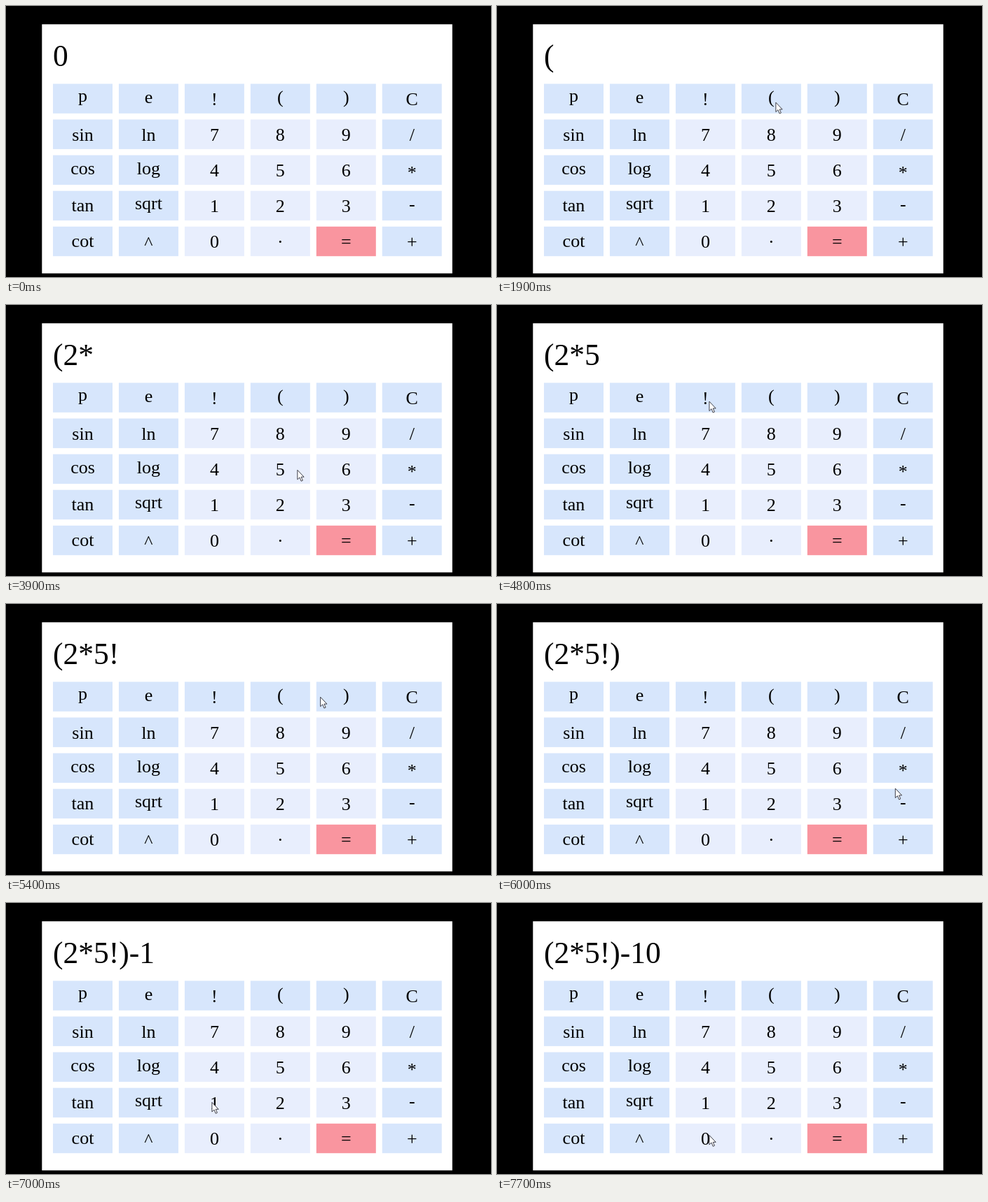
Write an HTML page that moves like this. It is 692 by 388 pixels and loops after 8000 ms.

```html
<!DOCTYPE html>
<html lang="en">
<head>
<meta charset="utf-8">
<title>Calculator</title>
<style>
  html, body { margin: 0; width: 100%; height: 100%; overflow: hidden; background: #000; }
  svg { display: block; }
  text { font-family: "Liberation Serif", "Times New Roman", serif; fill: #000; }
</style>
</head>
<body>
<svg width="692" height="388" viewBox="0 0 692 388">
  <rect x="51.3" y="26.2" width="585.5" height="356.6" fill="#fff"/>
  <g id="keys"></g>
  <text id="display" x="67" y="86.4" font-size="43.5"></text>
  <path id="cursor" d="M.5 .5V14L3.6 11.1L5.8 16.4L8 15.4L5.8 10.4H9.8Z"
        fill="#fff" stroke="#2b2b35" stroke-width=".9" stroke-linejoin="round"/>
</svg>
<script>
const LOOP = 8000, STEP = 100;
const KEY = { width: 85, height: 42.4, font: 26 };
const ROWS = [
  "p e ! ( ) C",
  "sin ln 7 8 9 /",
  "cos log 4 5 6 *",
  "tan sqrt 1 2 3 -",
  "cot ^ 0 · = +"
].map(row => row.split(" "));

// Pointer travels from `leave` to `arrive`, resting at an offset from the key's centre.
const PRESSES = [
  { key: "(", leave: 1900, arrive: 1900, typed: 1900, dx: 6, dy: 5 },
  { key: "2", leave: 1900, arrive: 2400, typed: 2500, dx: 14, dy: 8 },
  { key: "*", leave: 2700, arrive: 3000, typed: 3200, dx: 11, dy: 0 },
  { key: "5", leave: 3500, arrive: 3900, typed: 4400, dx: 24, dy: 1 },
  { key: "!", leave: 4400, arrive: 4800, typed: 4900, dx: 5, dy: 5 },
  { key: ")", leave: 4900, arrive: 5500, typed: 5600, dx: -33, dy: 0 },
  { key: "-", leave: 5600, arrive: 6200, typed: 6300, dx: 3, dy: -6 },
  { key: "1", leave: 6400, arrive: 6900, typed: 6900, dx: -4, dy: -1 },
  { key: "0", leave: 7000, arrive: 7600, typed: 7700, dx: 5, dy: -5 }
];

const byId = id => document.getElementById(id);
const display = byId("display"), cursor = byId("cursor");
const easeOut = k => 1 - (1 - k) ** 2;
const clamp = k => Math.min(1, Math.max(0, k));

const keyCenter = (row, col) => [109.5 + 93.95 * col, 132.6 + 51.1 * row];

function restPoint({ key, dx, dy }) {
  const row = ROWS.findIndex(labels => labels.includes(key));
  const [x, y] = keyCenter(row, ROWS[row].indexOf(key));
  return [x + dx, y + dy];
}

function add(tag, attrs, text = "") {
  const node = document.createElementNS("http://www.w3.org/2000/svg", tag);
  for (const name in attrs) node.setAttribute(name, attrs[name]);
  node.textContent = text;
  byId("keys").appendChild(node);
}

function keyColor(label) {
  if (label === "=") return "#f9959f";
  return /[0-9·]/.test(label) ? "#e8eefd" : "#d7e6fc";
}

function buildKeys() {
  const { width, height, font } = KEY;
  const ink = document.createElement("canvas").getContext("2d");
  ink.font = `${font}px "Liberation Serif", "Times New Roman", serif`;
  ROWS.forEach((labels, row) => labels.forEach((label, col) => {
    const [x, y] = keyCenter(row, col);
    add("rect", { x: x - width / 2, y: y - height / 2, width, height, fill: keyColor(label) });
    // Each label is centred vertically by its inked area.
    const m = ink.measureText(label);
    const drop = (m.actualBoundingBoxAscent - m.actualBoundingBoxDescent) / 2;
    add("text", { x, y: y + drop + 0.4, "font-size": font, "text-anchor": "middle" }, label);
  }));
}

function pointerAt(t) {
  const i = PRESSES.findLastIndex(p => p.leave <= t);
  if (i < 0) return null;
  const { leave, arrive } = PRESSES[i];
  const from = restPoint(PRESSES[Math.max(0, i - 1)]), to = restPoint(PRESSES[i]);
  const k = easeOut(clamp((t - leave) / (arrive - leave || 1)));
  return from.map((v, axis) => v + (to[axis] - v) * k);
}

function render(time) {
  const t = Math.floor((time % LOOP) / STEP) * STEP;
  const typed = PRESSES.filter(p => p.typed <= t).map(p => p.key).join("");
  display.textContent = typed || "0";
  const tip = pointerAt(t);
  cursor.setAttribute("visibility", tip ? "visible" : "hidden");
  if (tip) cursor.setAttribute("transform", `translate(${tip})`);
}

buildKeys();
render(0);
const start = performance.now();
(function tick() {
  render(performance.now() - start);
  requestAnimationFrame(tick);
})();
</script>
</body>
</html>
```
